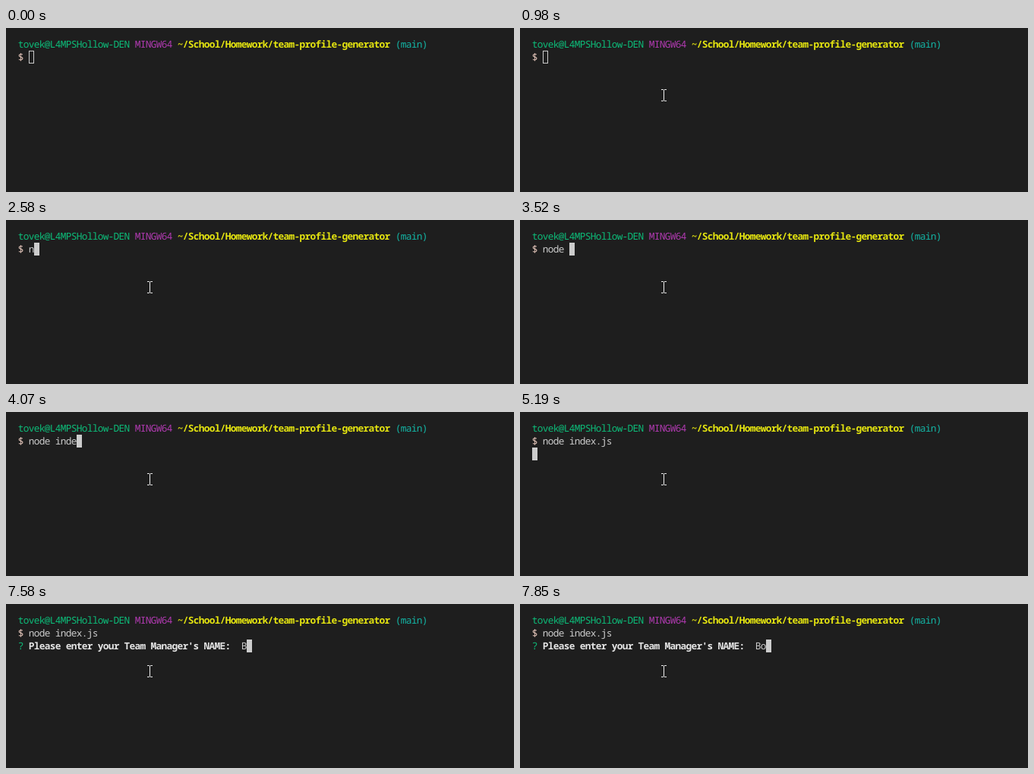
Write an HTML page that moves like this. It is 669 px wide and 217 px high and loops after 8 s.

```html
<!DOCTYPE html>
<html lang="en">
<head>
<meta charset="utf-8">
<title>Terminal session</title>
<style>
  html, body { margin: 0; width: 100%; height: 100%; overflow: hidden; background: #1e1e1e; }
  svg { display: block; width: 669px; height: 217px; }
  /* 0.6em advance, tightened to the 7px terminal cell */
  text {
    font: 500 12.8px "Noto Sans Mono", "DejaVu Sans Mono", monospace;
    letter-spacing: calc(7px - 0.6em);
    white-space: pre;
    text-rendering: geometricPrecision;
    font-variant-ligatures: none;
  }
  .bold { font-weight: 700; }
</style>
</head>
<body>
<svg id="stage" viewBox="0 0 669 217">
  <rect width="669" height="217" fill="#1e1e1e"/>
  <g id="terminal"></g>
  <rect id="cursor"/>
  <path id="pointer" d="M-3 -7.5H0M1 -7.5H4M.5 -7V7M-3 7.5H0M1 7.5H4" fill="none" stroke="#f0f0f0"/>
</svg>
<script>
const LOOP = 8000;
const CELL = { x: 16, y: 13, w: 7, h: 17, baseline: 13 };
const GREEN = "#0dbc79", WHITE = "#cccccc";
const COMMAND = "node index.js";
const COMMAND_KEYS = [2580, 2790, 2860, 2920, 3520, 3870, 3940, 4000, 4070, 4330, 4600, 4730, 4860];
const ANSWER = "Bo";
const ANSWER_KEYS = [7580, 7850];
const POINTER_AT = 130, REST_AT = 980, FOCUS_AT = 1120, ENTER_AT = 5190, PROMPT_AT = 5780;
const ANSWER_COL = 42;

const byId = id => document.getElementById(id);
const terminal = byId("terminal"), cursor = byId("cursor"), pointer = byId("pointer");

function setAttrs(node, attrs) {
  for (const name in attrs) node.setAttribute(name, attrs[name]);
}

function addText(row, col, content, fill, bold) {
  const node = document.createElementNS("http://www.w3.org/2000/svg", "text");
  setAttrs(node, {
    // half the tightening on each side keeps glyphs centred in their cells
    x: CELL.x + col * CELL.w - 0.34,
    y: CELL.y + row * CELL.h + CELL.baseline,
    fill
  });
  if (bold) node.setAttribute("class", "bold");
  node.textContent = content;
  terminal.append(node);
  return node;
}

addText(0, 0, "tovek@L4MPSHollow-DEN", GREEN);
addText(0, 22, "MINGW64", "#b03ab0");
addText(0, 30, "~/School/Homework/team-profile-generator", "#e5e510", true);
addText(0, 71, "(main)", "#14b5a5");
addText(1, 0, "$", "#ecccc0");
const command = addText(1, 2, "", WHITE);
const question = [
  addText(2, 0, "?", GREEN),
  addText(2, 2, "Please enter your Team Manager's NAME:", "#e5e5e5", true)
];
const answer = addText(2, ANSWER_COL, "", WHITE);

const typed = (content, keys, t) => content.slice(0, keys.filter(key => key <= t).length);
const bezier = (a, b, c, p) => (1 - p) ** 2 * a + 2 * p * (1 - p) * b + p * p * c;

function pointerPosition(t) {
  if (t >= REST_AT) return [189, 89];
  const step = Math.min(9, Math.floor((t - POINTER_AT) / 80));
  const p = 1 - (1 - step / 9) ** 1.6;
  return [bezier(594, 330, 194, p), bezier(214, 60, 92, p)].map(Math.round);
}

function placeCursor(row, col, filled) {
  const inset = filled ? 0 : 0.5;
  setAttrs(cursor, {
    x: CELL.x + col * CELL.w + inset,
    y: CELL.y + row * CELL.h + inset,
    width: CELL.w - 2 * inset,
    height: CELL.h - 2 * inset,
    fill: filled ? WHITE : "none",
    stroke: filled ? "none" : WHITE
  });
}

function render(t) {
  command.textContent = typed(COMMAND, COMMAND_KEYS, t);
  answer.textContent = typed(ANSWER, ANSWER_KEYS, t);

  const prompted = t >= PROMPT_AT;
  for (const part of question) part.setAttribute("visibility", prompted ? "visible" : "hidden");

  if (prompted) placeCursor(2, ANSWER_COL + answer.textContent.length, true);
  else if (t >= ENTER_AT) placeCursor(2, 0, true);
  else placeCursor(1, 2 + command.textContent.length, t >= FOCUS_AT);

  const pointing = t >= POINTER_AT;
  pointer.setAttribute("visibility", pointing ? "visible" : "hidden");
  if (pointing) pointer.setAttribute("transform", `translate(${pointerPosition(t).join(" ")})`);
}

const start = performance.now();
function tick() {
  render((performance.now() - start) % LOOP);
  requestAnimationFrame(tick);
}
tick();
</script>
</body>
</html>
```
